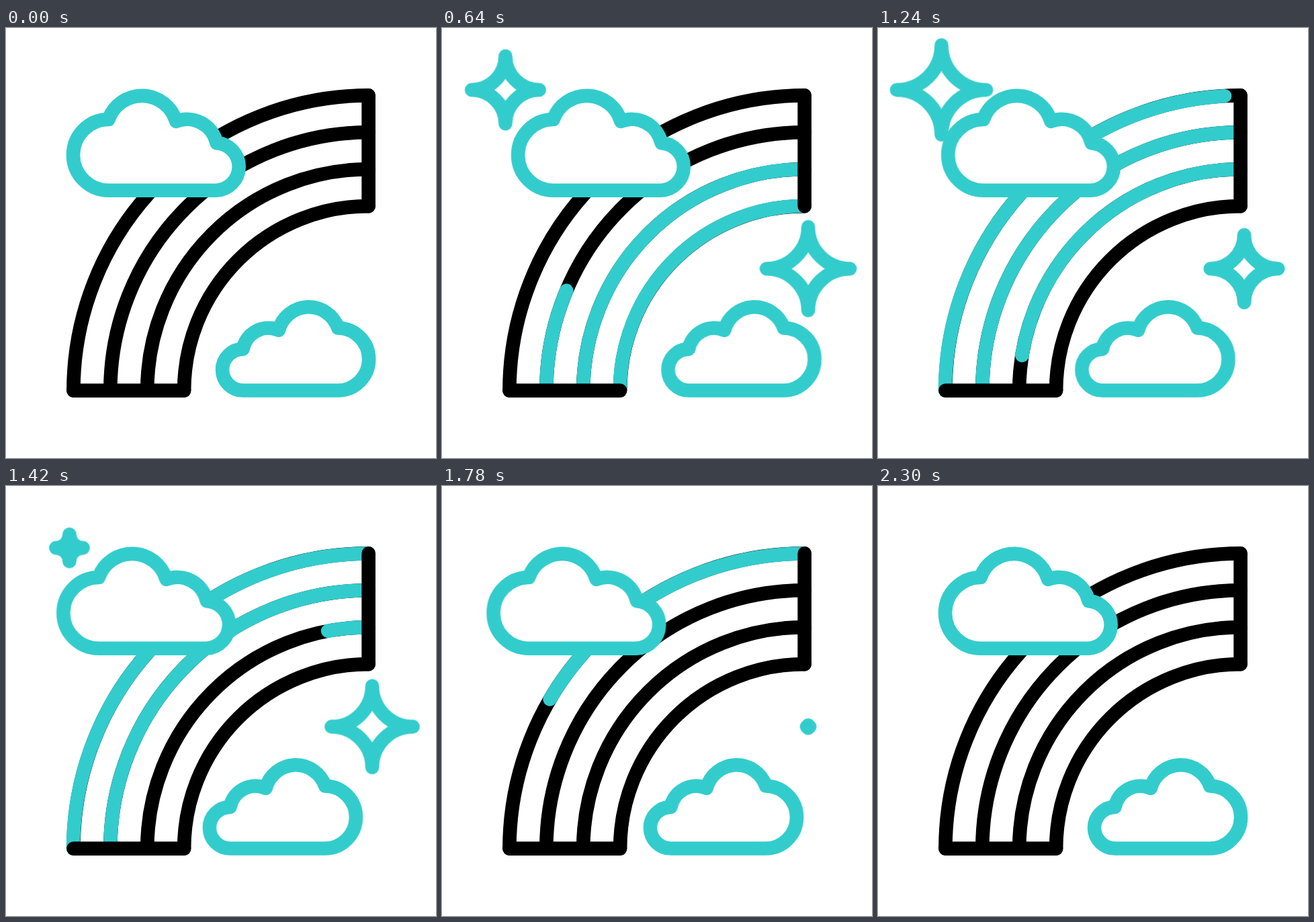
An HTML page for the animation above (2400 ms loop, 640x640 px).

```html
<!DOCTYPE html>
<html lang="en">
<head>
<meta charset="utf-8">
<title>Rainbow and clouds</title>
<style>
  html, body { margin: 0; width: 100%; height: 100%; overflow: hidden; background: #fff; }
  svg { display: block; width: 640px; height: 640px; }

  path { fill: none; stroke: #000; stroke-width: 20.6; stroke-linecap: round; stroke-linejoin: round; }
  .teal path { stroke: #33cccc; }
  .cloud { fill: #fff; }
  .star { vector-effect: non-scaling-stroke; }
  .trim { stroke-dasharray: 1 3; stroke-dashoffset: 1.01; }

  .trim, .cloud, .star {
    animation: 2400ms cubic-bezier(.3333, 0, .6667, 1) infinite both;
  }
  #band1 { animation-name: band1; }
  #band2 { animation-name: band2; }
  #band3 { animation-name: band3; }
  #band4 { animation-name: band4; }
  #cloudL { animation-name: driftL; }
  #cloudR { animation-name: driftR; }
  #starL { animation-name: twinkleL; }
  #starR { animation-name: twinkleR; }

  /* Each band is painted from its foot, then wiped the same way. */
  @keyframes band1 {
    0%, 31.63% { stroke-dashoffset: 1.01; }
    54.21%, 67.5% { stroke-dashoffset: 0; }
    84.8%, 100% { stroke-dashoffset: -1.01; }
  }
  @keyframes band2 {
    0%, 21.5% { stroke-dashoffset: 1.01; }
    37.08%, 58.13% { stroke-dashoffset: 0; }
    71.04%, 100% { stroke-dashoffset: -1.01; }
  }
  @keyframes band3 {
    0%, 11.33% { stroke-dashoffset: 1.01; }
    27.17%, 49.17% { stroke-dashoffset: 0; }
    62.08%, 100% { stroke-dashoffset: -1.01; }
  }
  @keyframes band4 {
    0% { stroke-dashoffset: 1.01; }
    16.25%, 38.33% { stroke-dashoffset: 0; }
    51.25%, 100% { stroke-dashoffset: -1.01; }
  }

  @keyframes driftL {
    0%, 10% { transform: translateX(0); }
    40% { transform: translateX(22.4px); }
    68.33% { transform: translateX(-26.6px); }
    95.83%, 100% { transform: translateX(0); }
  }
  @keyframes driftR {
    0% { transform: translateX(0); }
    17.5%, 36.67% { transform: translateX(14.5px); }
    52.92%, 66.67% { transform: translateX(-19.2px); }
    85%, 100% { transform: translateX(0); }
  }

  @keyframes twinkleL {
    0%, 4.17% { transform: scale(0); }
    16.67% { transform: scale(1); }
    24.4%, 42.92% { transform: scale(.753); }
    51.25% { transform: scale(1); }
    63.75%, 100% { transform: scale(0); }
  }
  @keyframes twinkleR {
    0%, 16.25% { transform: scale(0); }
    28.75% { transform: scale(1); }
    36.46%, 54.6% { transform: scale(.753); }
    62.5% { transform: scale(1); }
    75.6%, 100% { transform: scale(0); }
  }
</style>
</head>
<body>
<svg viewBox="0 0 640 640">
  <g>
    <path d="M100.4 539.6A439.2 439.2 0 0 1 539.6 100.4"/>
    <path d="M155.3 539.6A384.3 384.3 0 0 1 539.6 155.3"/>
    <path d="M210.2 539.6A329.4 329.4 0 0 1 539.6 210.2"/>
    <path d="M265.1 539.6A274.5 274.5 0 0 1 539.6 265.1"/>
  </g>
  <g class="teal">
    <path id="band1" class="trim" pathLength="1" d="M100 539.6A439.6 439.6 0 0 1 539.6 100.6"/>
    <path id="band2" class="trim" pathLength="1" d="M155.3 539.6A384.3 384.3 0 0 1 539.6 155.3"/>
    <path id="band3" class="trim" pathLength="1" d="M210.2 539.6A329.4 329.4 0 0 1 539.6 210.2"/>
    <path id="band4" class="trim" pathLength="1" d="M264.8 539.6A274.9 274.9 0 0 1 539.6 264.8"/>
  </g>
  <path d="M100.4 539.6H265.1M539.6 100.4V265.1"/>
  <g class="teal">
    <g transform="translate(94.4 92.1)">
      <path id="starL" class="star" d="M0-66.8A66.8 66.8 0 0 0 66.8 0A66.8 66.8 0 0 0 0 66.8A66.8 66.8 0 0 0-66.8 0A66.8 66.8 0 0 0 0-66.8Z"/>
    </g>
    <g transform="translate(545 358.2)">
      <path id="starR" class="star" d="M0-66.8A66.8 66.8 0 0 0 66.8 0A66.8 66.8 0 0 0 0 66.8A66.8 66.8 0 0 0-66.8 0A66.8 66.8 0 0 0 0-66.8Z"/>
    </g>
    <path id="cloudL" class="cloud" d="M153.2 241.8A52.9 52.9 0 0 1 152.6 136A52.8 52.8 0 0 1 253.1 139A45 45 0 0 1 313.4 171.1A35.4 35.4 0 0 1 312.9 241.8Z"/>
    <path id="cloudR" class="cloud" d="M493 539.5A46.5 46.5 0 0 0 494.2 446.5A46.2 46.2 0 0 0 405.8 449.8A38.5 38.5 0 0 0 352.6 477.9A30.8 30.8 0 0 0 353 539.5Z"/>
  </g>
</svg>
</body>
</html>
```
